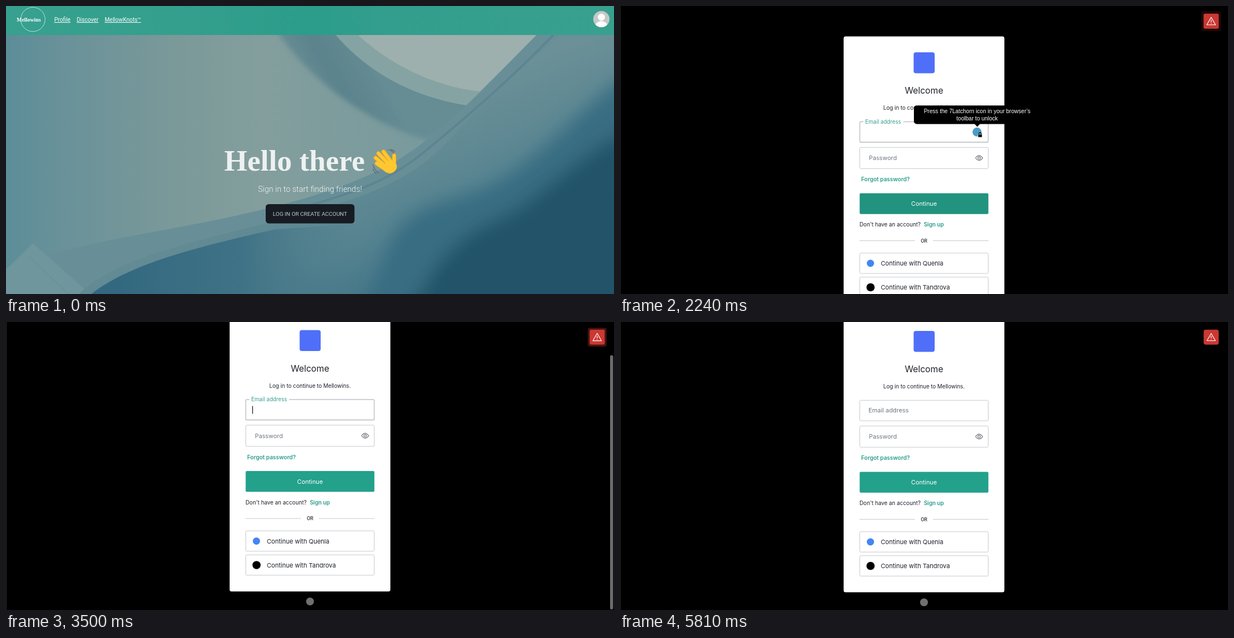
These frames come from a looping animation (1084x516 px, 5.95 s). An HTML page:

```html
<!DOCTYPE html>
<html lang="en">
<head>
<meta charset="utf-8">
<title>Sign in</title>
<style>
  html, body { margin: 0; width: 100%; height: 100%; overflow: hidden; background: #000; }
  svg { display: block; width: 1084px; height: 516px; font-family: Inter, sans-serif; }
  .roboto { font-family: Roboto, sans-serif; }
  .serif { font-family: "Liberation Serif", serif; font-weight: 700; }
  .mid { text-anchor: middle; }
  .link { font-weight: 600; fill: #2a9d8a; }
  .box { fill: #fff; stroke: #c9cace; }
</style>
</head>
<body>
<svg viewBox="0 0 1084 516">
  <defs>
    <linearGradient id="sky">
      <stop offset="0" stop-color="#5c8d98"/>
      <stop offset=".1" stop-color="#6a929a"/>
      <stop offset=".28" stop-color="#7b9999"/>
      <stop offset=".42" stop-color="#839e9d"/>
      <stop offset=".7" stop-color="#789a9d"/>
    </linearGradient>
    <linearGradient id="fold" gradientUnits="userSpaceOnUse" x1="500" y1="200" x2="660" y2="110">
      <stop offset="0" stop-color="#769599"/>
      <stop offset=".6" stop-color="#5b838d"/>
      <stop offset="1" stop-color="#668c94"/>
    </linearGradient>
    <linearGradient id="sea" gradientUnits="userSpaceOnUse" x1="760" y1="170" x2="900" y2="516">
      <stop offset="0" stop-color="#6b9097"/>
      <stop offset=".5" stop-color="#568390"/>
      <stop offset="1" stop-color="#356b80"/>
    </linearGradient>
    <linearGradient id="deep" gradientUnits="userSpaceOnUse" x1="200" y1="470" x2="640" y2="470">
      <stop offset="0" stop-color="#336980"/>
      <stop offset=".5" stop-color="#3f7286"/>
      <stop offset="1" stop-color="#4f7f8d" stop-opacity="0"/>
    </linearGradient>
    <linearGradient id="bar">
      <stop offset="0" stop-color="#37a08f"/>
      <stop offset=".28" stop-color="#359f8e"/>
      <stop offset=".5" stop-color="#2b9d8a"/>
      <stop offset=".62" stop-color="#339e8d"/>
      <stop offset="1" stop-color="#38a08f"/>
    </linearGradient>
    <filter id="soft" x="-20%" y="-20%" width="140%" height="140%"><feGaussianBlur stdDeviation="16"/></filter>
    <filter id="haze"><feGaussianBlur stdDeviation="5"/></filter>
    <clipPath id="face"><circle cx="1061.5" cy="23.5" r="14.5"/></clipPath>
  </defs>

  <g id="home">
    <rect width="1084" height="516" fill="url(#sky)"/>
    <path d="M480 40C530 120 630 205 750 240L850 185 800 40Z" fill="url(#fold)" filter="url(#haze)"/>
    <path d="M588 52C650 125 740 170 843 181L990 52Z" fill="#86a3a3"/>
    <path d="M628 52C690 110 770 145 845 153L946 52Z" fill="#9db0ad"/>
    <path d="M0 470C120 425 260 408 390 380S640 318 720 262 880 118 946 52H1084V516H0Z" fill="#688f97"/>
    <path d="M0 472L48 425 150 516H0Z" fill="#6e969c"/>
    <path d="M40 448L112 516" stroke="#5b858f" opacity=".6"/>
    <path d="M130 516C190 455 320 425 470 388S720 318 790 240 930 100 990 52H1084V516Z" fill="url(#sea)"/>
    <path d="M976 52C890 140 820 200 745 262S600 340 470 378" fill="none" stroke="#527e8b" stroke-width="4" opacity=".55"/>
    <path d="M152 516C220 462 340 432 480 400L640 390 640 516Z" fill="url(#deep)"/>
    <g filter="url(#soft)">
      <path d="M1110 120C980 220 930 310 800 345S690 430 640 540H1120Z" fill="#386d82"/>
      <path d="M1110 220C1000 280 950 350 870 385S760 470 720 550H1120Z" fill="#225369"/>
    </g>
    <rect width="1084" height="52" fill="url(#bar)"/>
    <circle cx="48" cy="24" r="21.7" fill="none" stroke="#d9efeb" stroke-width=".8"/>
    <g fill="#fff">
      <text class="serif" x="19" y="27.5" font-size="9.8">Mellowins</text>
      <g class="roboto" font-size="10.1" text-decoration="underline">
        <text x="86" y="28">Profile</text>
        <text x="126" y="28">Discover</text>
        <text x="176" y="28">MellowKnots™</text>
      </g>
    </g>
    <g clip-path="url(#face)">
      <rect x="1046" y="8" width="31" height="31" fill="#c6c8c8"/>
      <circle cx="1061.5" cy="20" r="6.3" fill="#fff"/>
      <ellipse cx="1061.5" cy="36" rx="11" ry="9" fill="#fff"/>
    </g>
    <text class="serif" x="389" y="295" font-size="53" fill="#eef1f1">Hello there</text>
    <g fill="none" stroke-linecap="round">
      <g stroke="#f0a51c" stroke-width="7.5">
        <path d="M661 282L678 294M659 272L680 290M664 264L684 285M673 261L688 281M692 268L692 286"/>
      </g>
      <path d="M678 282L690 278 696 286C696 295 689 299 684 299 679 299 675 295 671 290Z" fill="#ffc832" stroke="#ffc832" stroke-width="2"/>
      <path d="M661 282L678 294M659 272L680 290M664 264L684 285M673 261L688 281M692 268L692 286" stroke="#ffc832" stroke-width="5.6"/>
      <path d="M654 284Q657 294 664 299M654 292Q656 297 660 300M681 257Q688 259 691 263M686 257Q690 258 693 261" stroke="#5f6b70" stroke-width="1.3"/>
    </g>
    <text class="roboto mid" x="542" y="332.5" font-size="14.2" font-weight="300" fill="#f0f4f4">Sign in to start finding friends!</text>
    <g id="login">
      <rect id="ring" x="461.5" y="353.7" width="161" height="37.3" rx="7" fill="#0e2d3c"/>
      <rect id="loginBox" x="463" y="355" width="158.3" height="34.5" rx="5.5"/>
      <text class="roboto mid" x="542" y="376" font-size="9.95" fill="#c3ccd2">LOG IN OR CREATE ACCOUNT</text>
    </g>
  </g>

  <g id="form">
    <rect width="1084" height="516"/>
    <rect width="1" height="516" fill="#2b2b2b"/>
    <g id="page">
      <rect x="398.7" y="54.5" width="286.6" height="496.7" rx="3.5" fill="#fff"/>
      <rect x="523.5" y="83" width="37.5" height="37.5" rx="4" fill="#4f6ff8"/>
      <g fill="#1e212a">
        <text class="mid" x="542" y="157" font-size="15.6">Welcome</text>
        <text class="mid" x="542" y="186" font-size="9.7">Log in to continue to Mellowins.</text>
        <text x="427" y="395.3" font-size="9.8">Don't have an account?</text>
        <text class="mid" x="542" y="423.6" font-size="8.3" font-weight="500">OR</text>
      </g>
      <rect id="email" class="box" x="427.5" y="207.3" width="229" height="36.7" rx="2"/>
      <rect id="notch" x="434" y="205" width="71" height="5" fill="#fff"/>
      <text id="label">Email address</text>
      <rect id="caret" x="439" y="219" width="1.2" height="14" fill="#111"/>
      <rect class="box" x="427.5" y="253.3" width="229" height="38" rx="2"/>
      <text x="443.8" y="276.3" font-size="10.75" fill="#6f7680">Password</text>
      <g fill="none" stroke="#686e75" stroke-width="1.1">
        <path d="M634 272.3Q640 263.5 646.5 272.3Q640 281 634 272.3Z"/>
        <circle cx="640.2" cy="272.3" r="2.2"/>
      </g>
      <text class="link" x="430" y="314.3" font-size="10">Forgot password?</text>
      <rect id="go" x="427.3" y="335.5" width="229.5" height="37.3" rx="2"/>
      <text class="mid" x="542" y="358.3" font-size="10.8" fill="#fff">Continue</text>
      <text class="link" x="541.7" y="395.3" font-size="9.85">Sign up</text>
      <path d="M427 420.5H526M558 420.5H657" stroke="#c9cace"/>
      <rect id="social" class="box" x="427.5" y="442.7" width="229" height="36.5" rx="2"/>
      <circle cx="446.5" cy="461" r="6.5" fill="#4285f4"/>
      <rect class="box" x="427.5" y="485.7" width="229" height="36.5" rx="2"/>
      <circle cx="446.7" cy="504" r="7.3"/>
      <g font-size="11" fill="#1e212a">
        <text x="465" y="465">Continue with Quenla</text>
        <text x="465" y="508">Continue with Tandrova</text>
      </g>
      <circle cx="542" cy="569.2" r="7" fill="#707070"/>
      <g id="tip">
        <circle cx="636.5" cy="225.8" r="8" fill="#4b9cc6"/>
        <rect x="638.2" y="229.8" width="7.5" height="5.4" rx="1" stroke="#fff" stroke-width=".8"/>
        <path d="M640 230V228.6a2 2 0 0 1 4 0V230" fill="none" stroke="#000" stroke-width="1.2"/>
        <rect x="524" y="178.2" width="226" height="33.2" rx="5"/>
        <path d="M632 211L637 216.5 642 211Z"/>
        <g class="mid" font-size="10.05" fill="#fff" font-family="Liberation Sans, sans-serif">
          <text x="636.7" y="191.8">Press the 7Latchorn icon in your browser’s</text>
          <text x="636.7" y="205.2">toolbar to unlock</text>
        </g>
      </g>
    </g>
    <rect id="thumb" x="1077" width="5.5" rx="2.7" fill="#6c6c6c"/>
    <rect id="glow" fill="#d33a35"/>
    <g id="alert">
      <rect x="-13.6" y="-13.6" width="27.2" height="27.2" rx="2.5" fill="#cb3832"/>
      <path d="M0 -7L7.8 6.6H-7.8Z" fill="none" stroke="#fff" stroke-width="1.2" stroke-linejoin="round"/>
      <path d="M0 -2.4V2M0 3.6V4.8" stroke="#fff" stroke-width="1.2"/>
    </g>
  </g>
</svg>
<script>
const LOOP = 5950, STEP = 70;
const $ = id => document.getElementById(id);
const set = (id, attrs) => { for (const k in attrs) $(id).setAttribute(k, attrs[k]); };
const show = (id, on) => set(id, { visibility: on ? "inherit" : "hidden" });
const ramp = (t, a, b) => Math.min(1, Math.max(0, (t - a) / (b - a)));
const lerp = (a, b, p) => a + (b - a) * p;
const mix = (a, b, p) => `rgb(${a.map((v, i) => Math.round(lerp(v, b[i], p)))})`;

// Scroll with a rubber-band overshoot: [time, offset]
const scrollPath = [[2380, 0], [2520, 22], [2730, 56.5], [2870, 70], [3080, 76], [3300, 72], [3500, 68.5], [3740, 67]];
function scrollAt(t) {
  let y = 0;
  scrollPath.forEach(([time, pos], i) => {
    if (i) y += (pos - scrollPath[i - 1][1]) * ramp(t, scrollPath[i - 1][0], time);
  });
  return y;
}

function drawHome(t) {
  set("loginBox", {
    fill: mix([22, 28, 34], [5, 78, 103], ramp(t, 70, 280)),
    stroke: t >= 700 ? "#dbe7ec" : "none",
    "stroke-width": 1.3
  });
  show("ring", t >= 700);
  const s = t < 700 ? 1 : lerp(.98, 1, ramp(t, 700, 980));
  set("login", { transform: `translate(542 372) scale(${s}) translate(-542 -372)` });
}

function drawAlert(t) {
  const phase = (t - 1370 + 1450) % 1450 / 1450;
  const out = ramp(phase, 0, .7), back = ramp(phase, .7, 1);
  const scale = lerp(.95, 1, out) - .05 * back;
  const half = 13.6 * scale + 5 * out * (1 - back);
  set("alert", { transform: `translate(1054 27.2) scale(${scale})` });
  set("glow", { x: 1054 - half, y: 27.2 - half, width: 2 * half, height: 2 * half, rx: 4, opacity: 1 - out });
}

function drawForm(t) {
  const y = scrollAt(t);
  set("page", { transform: `translate(0 ${-y})` });
  set("thumb", { y: y * .87, height: 515 - y * .87, opacity: ramp(t, 2380, 2450) * (1 - ramp(t, 3640, 3780)) });
  show("tip", t >= 1820 && t < 2450);

  const blur = ramp(t, 4270, 4400), focused = blur === 0;
  set("email", {
    "stroke-width": focused ? 1.8 : 1,
    stroke: mix([42, 147, 133], [201, 202, 206], ramp(t, 4310, 4480))
  });
  show("notch", focused);
  set("label", {
    x: lerp(437.3, 443, blur),
    y: lerp(210.5, 229.4, blur),
    "font-size": lerp(9.7, 10.9, blur),
    fill: focused ? "#38a092" : "#6f7680"
  });
  show("caret", focused && (t + 500) % 1000 < 500);

  set("go", { fill: mix([33, 147, 126], [35, 161, 139], ramp(t, 3150, 3360)) });
  const tint = [207, 228, 224];
  set("social", {
    fill: t < 4340 ? mix([255, 255, 255], tint, ramp(t, 4060, 4270)) : mix(tint, [204, 215, 212], ramp(t, 4340, 4620))
  });
  drawAlert(t);
}

function frame(now) {
  const t = Math.floor(now % LOOP / STEP) * STEP, home = t < 1330;
  show("home", home);
  show("form", !home);
  home ? drawHome(t) : drawForm(t);
  requestAnimationFrame(frame);
}
frame(0);
</script>
</body>
</html>
```
